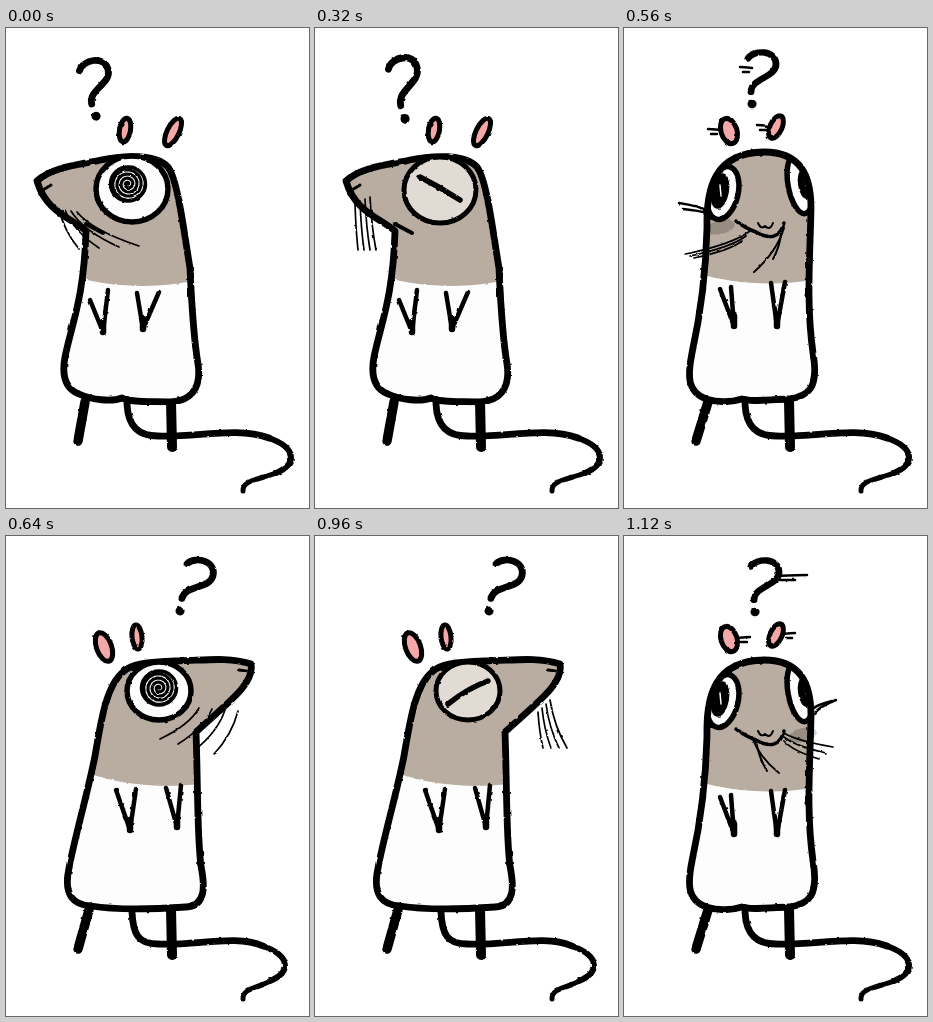
An HTML page that plays this animation: 303x480 px, repeating every 1200 ms.

```html
<!DOCTYPE html>
<html lang="en">
<head>
<meta charset="utf-8">
<title>Puzzled rat</title>
<style>
html, body { margin: 0; height: 100%; overflow: hidden; background: #fff; }
svg { display: block; width: 303px; height: 480px; }
</style>
</head>
<body>
<svg viewBox="0 0 303 480" fill="none" stroke="#000" stroke-linecap="round" stroke-linejoin="round">
  <filter id="rough" x="0" y="0" width="303" height="480" filterUnits="userSpaceOnUse" color-interpolation-filters="sRGB">
    <feTurbulence type="fractalNoise" baseFrequency=".2" seed="4"/>
    <feDisplacementMap in="SourceGraphic" scale="2.5" xChannelSelector="R" yChannelSelector="G"/>
  </filter>
  <g id="stage" filter="url(#rough)"></g>
</svg>
<script>
const STEP = 80, STEPS = 15;
const TAN = '#b9aca0', PINK = '#f5a8a8', LID = '#e2dbd3', WHITE = '#fdfdfd';
const stage = document.getElementById('stage');

const line = (d, w = 6.8, color = '#000') => `<path d="${d}" stroke-width="${w}" stroke="${color}"/>`;
const oval = (x, y, rx, ry, turn = 0, w = 5, fill = PINK) =>
  `<ellipse cx="${x}" cy="${y}" rx="${rx}" ry="${ry}" transform="rotate(${turn} ${x} ${y})" stroke-width="${w}" fill="${fill}"/>`;
const mix = (a, b, k) => a.map((v, i) => v + (b[i] - v) * k);
const wave = (n, peak) => Math.cos((n - peak) * Math.PI / 3);

function body(shape, patch, inside = '') {
  return `<clipPath id="skin"><path d="${shape}"/></clipPath>
    <path d="${shape}" fill="${WHITE}" stroke="none"/>
    <g clip-path="url(#skin)"><path d="${patch}" fill="${TAN}" stroke="none"/>${inside}</g>` + line(shape);
}

function spiral(x, y) {
  let d = '';
  for (let a = 0; a < 26; a += .4) {
    const r = 17.5 * (1 - a / 26);
    d += `${d ? 'L' : 'M'}${x + r * Math.cos(a)} ${y + r * Math.sin(a)}`;
  }
  return oval(x, y, 17.5, 17, 0, 3.5, 'none') + line(d, 3.1);
}

const openEye = (x, y, r, px, py) => oval(x, y, r, r - 3, 0, 5.5, WHITE) + spiral(px, py);
const shutEye = (x, y, r, slope) => oval(x, y, r, r - 3, 0, 5, LID) +
  line(`M${x - 20} ${y - 13 * slope}Q${x} ${y - 3} ${x + 20} ${y + 10 * slope}`, 5.5);

// The mark is placed by its dot
const question = (x, y, tilt, stretch) =>
  `<g transform="translate(${x} ${y}) scale(1 ${stretch}) rotate(${tilt})">` +
  line('M-4 -49C2 -59 24 -58 24 -43C24 -28 -1 -28 -1 -13') + line('M0 0h.1', 9) + '</g>';

// Root, step between roots, first tip offset, change of that offset per hair
const hairs = ([x, y, dx, dy, tx, ty, sx, sy], count = 4, w = 1.7) =>
  Array.from({ length: count }, (_, i) => {
    const rx = x + i * dx, ry = y + i * dy, ex = tx + i * sx, ey = ty + i * sy;
    return line(`M${rx} ${ry}q${ex * .25} ${ey * .55} ${ex} ${ey}`, w);
  }).join('');
const swing = n => Math.max(0, 1 - n * .7);

const paw = (ax, ay, bx, by, x, y) =>
  line(`M${ax} ${ay}L${x} ${y}L${bx} ${by}`, 4.5) + line(`M${x} ${y}v-10`, 6.5);
const legs = x => line(`M${x} 374L72 413`, 9.5) + line('M165 373L166 419', 10);
const tail = (x, reach) =>
  line(`M${x} 376C${x + 1} 398 132 408 152 408C190 410 230 398 ${reach - 24} 410`) +
  line(`M${reach - 24} 410C${reach + 4} 420 ${reach + 4} 436 ${reach - 17} 445`, 6) +
  line(`M${reach - 17} 445C255 451 236 452 237 463`, 5);

function lookLeft(n) {
  const eye = n === 4 ? shutEye(125, 162, 36, 1) : openEye(126, 161, 36, 122, 156);
  const hang = [40, 175, 5, -2, 3, 47, 1, 2], swept = [53, 181, 6, 1, 20, 40, 14, -2];
  return question(90, 89.5 + wave(n, 3.5) * 1.5, -15, 1.03 + wave(n, 3.5) * .055) +
    oval(119, 102, 5.5, 12, 10) + oval(167, 104, 6, 15, 26) + legs(79) + tail(121, 287) +
    body('M31 153C44 140 70 137 95 132C118 127 150 126 162 139C172 152 178 205 184 240C186 285 188 312 192 336C196 362 183 373 165 374C148 373 125 375 116 370C106 374 86 372 73 366C58 360 56 345 59 329C66 295 78 270 80 203C65 190 40 184 31 153Z',
      'M20 120H195V251C160 260 110 261 70 249Z') +
    line('M80 196L97 205', 4) + line('M37 162L45 157', 3) + eye +
    hairs(mix(hang, swept, swing(n))) +
    paw(84, 272, 102, 262, 97, 304) + paw(131, 265, 153, 264, 137, 301);
}

function lookRight(n) {
  const eye = n === 4 ? shutEye(153, 155, 32, -1) : openEye(153, 155, 32, 153, 152);
  const hang = [223, 176, 4, -4, 5, 36, 4, 4], swept = [232, 175, -13, -1, -24, 43, -5, -4];
  return question(174, 75, 13, .945 - wave(n, 2) * .055) +
    oval(98, 111, 7.5, 15, -20) + oval(131, 101, 5, 12, -6) + legs(83) + tail(126, 281) +
    body('M245 128C220 120 195 125 170 125C140 126 125 128 117 136C100 150 95 185 89 220C81 260 69 300 63 332C57 360 68 369 85 370C110 374 150 373 180 371C200 370 199 350 195 330C191 300 192 250 190 196C220 168 249 148 245 128Z',
      'M80 115H255V200L193 248C160 252 115 250 80 236Z') +
    line('M233 134L240 135', 3) + eye +
    hairs(mix(hang, swept, swing(n))) +
    paw(110, 254, 130, 253, 124, 294) + paw(160, 252, 175, 249, 171, 291);
}

// trail: side on which the turn leaves streaks, -1 left or 1 right
function lookAhead(trail) {
  const streaks = (x, y, reach) => hairs([x, y, 3 * trail, 4, reach * trail, -1, -reach * trail / 2, 1], 2, 2.5);
  const eyes = oval(99, 165, 15, 27, 14, 5.5, WHITE) + oval(96, 163, 7, 16, 10, 4, '#000') +
    oval(176, 156, 12, 30, -10, 5.5, WHITE) + oval(181, 156, 5, 13, -8, 4, '#000') +
    line('M96 157L97 168M181 150L182 158', 1.5, '#fff');
  const side = trail < 0
    ? hairs([126, 203, -4, 5, -64, 23, 8, -3], 3) + hairs([82, 182, 0, 3, -27, -7, 4, 3], 2, 2.5) +
      hairs([160, 200, -3, 7, -30, 44, 22, -20], 2, 2)
    : hairs([160, 197, 0, 4, 49, 14, -7, 2], 3) + hairs([190, 178, 0, -6, 22, -14, -4, 7], 2, 2.5) +
      hairs([128, 201, 4, 4, 27, 36, -16, -6], 2, 2);
  return question(trail < 0 ? 128 : 131, 76, 0, .93) +
    streaks(trail < 0 ? 128 : 153, 40, trail < 0 ? 12 : 30) +
    oval(105, 103, 8, 13, -18) + oval(152, 99, 6, 12, 25) +
    streaks(105 + 9 * trail, 102, 12) + streaks(152 + 7 * trail, 98, 12) +
    legs(84) + tail(121, 287) +
    body('M83 200C82 160 90 125 140 124C177 124 187 148 187 180C186 230 182 275 189 325C195 360 185 368 165 371C140 372 128 374 118 371C105 375 92 374 82 371C64 364 63 350 68 325C78 280 82 240 83 200Z',
      'M70 110H200V250C160 258 112 258 70 244Z', eyes) +
    `<g opacity=".18">${oval(138 + 41 * trail, 199, 14, 7, -12, 0, '#000')}</g>` +
    line('M112 193C120 199 126 202 132 204C146 212 156 210 160 195', 3.5) +
    line('M134 195Q137 202 141 198Q146 203 149 195', 2) + side +
    paw(96, 261, 107, 259, 110, 298) + paw(147, 255, 161, 254, 153, 298);
}

function scene(n) {
  if (n < 7) return lookLeft(n);
  if (n === 7) return lookAhead(-1);
  if (n < 14) return lookRight(n - 8);
  return lookAhead(1);
}

let shown = -1;
const start = performance.now();
function tick() {
  const n = Math.floor((performance.now() - start) / STEP) % STEPS;
  if (n !== shown) stage.innerHTML = scene(shown = n);
  requestAnimationFrame(tick);
}
tick();
</script>
</body>
</html>
```
